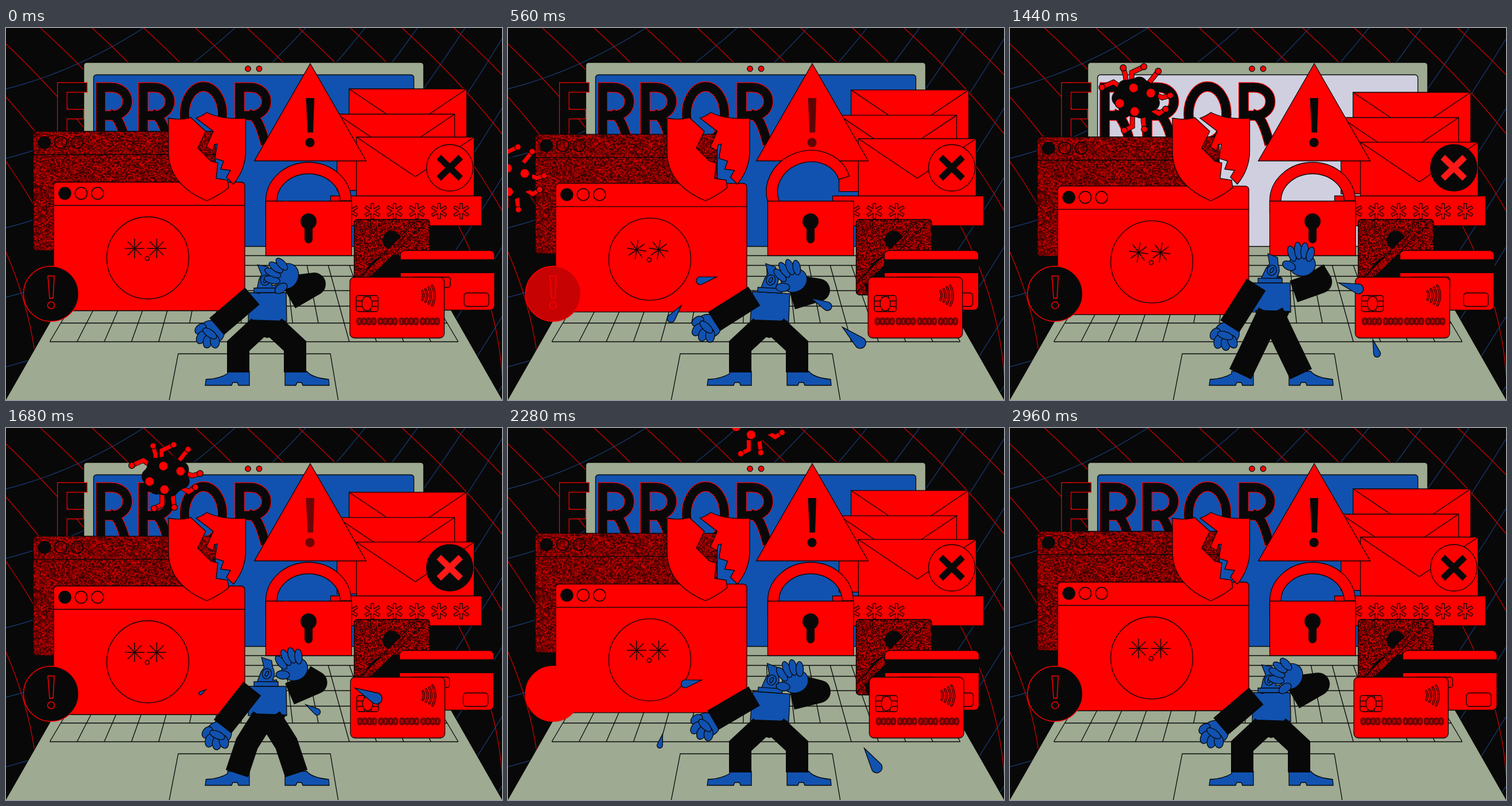
These frames come from a looping animation (864x648 px, 3000 ms). An HTML page with a canvas:

```html
<!DOCTYPE html>
<html lang="en">
<head>
<meta charset="utf-8">
<title>Error</title>
<style>
html, body { margin: 0; width: 100%; height: 100%; overflow: hidden; background: #080808; }
canvas { display: block; width: 864px; height: 648px; }
</style>
</head>
<body>
<canvas id="stage" width="864" height="648" role="img" aria-label="ERROR"></canvas>
<script>
const ctx = document.getElementById('stage').getContext('2d');
const LOOP = 3000, HALF = LOOP / 2, STEP = 40, TAU = Math.PI * 2, RAD = Math.PI / 180;
const RED = '#ff0000', BLUE = '#1152b0', INK = '#080808', METAL = '#9eaa92', PALE = '#d0cfe0';

// ---- drawing helpers
function paint(path, fill, line = INK, width = 1.3) {
  if (typeof path === 'string') path = new Path2D(path);
  if (fill) { ctx.fillStyle = fill; ctx.fill(path); }
  if (line) { ctx.strokeStyle = line; ctx.lineWidth = width; ctx.stroke(path); }
}
function oval(x, y, rx, ry, fill, line, width, turn = 0) {
  const p = new Path2D();
  p.ellipse(x, y, rx, ry, turn * RAD, 0, TAU);
  paint(p, fill, line, width);
}
const dot = (x, y, r, fill, line, width) => oval(x, y, r, r, fill, line, width);
function box(x, y, w, h, r, fill, line, width) {
  const p = new Path2D();
  p.roundRect(x, y, w, h, r);
  paint(p, fill, line, width);
}
function at(x, y, turn, draw) {
  ctx.save();
  ctx.translate(x, y);
  ctx.rotate(turn * RAD);
  draw();
  ctx.restore();
}
// thick line with a thin outline on both sides
function tube(path, width, fill, line, edge = 2) {
  paint(path, null, line, width + edge);
  paint(path, null, fill, width);
}
function capped(cap, draw) {
  ctx.lineCap = cap;
  draw();
  ctx.lineCap = 'butt';
}

// ---- motion helpers
const mix = (a, b, u) => a + (b - a) * u;
const wave = u => (1 - Math.cos(TAU * u)) / 2;
function ease(t, from, to) {
  const u = Math.min(1, Math.max(0, (t - from) / (to - from)));
  return u * u * (3 - 2 * u);
}
// rises from a to b, stays until c, falls until d
const hump = (t, a, b, c, d) => ease(t, a, b) * (1 - ease(t, c, d));
function redness(a) {
  const low = Math.round(mix(8, 0, a));
  return `rgb(${Math.round(mix(8, 255, a))},${low},${low})`;
}

// ---- grain texture
function makeGrain() {
  const c = document.createElement('canvas'), n = 256;
  c.width = c.height = n;
  const g = c.getContext('2d');
  g.fillStyle = '#c40000';
  g.fillRect(0, 0, n, n);
  let seed = 7;
  const rnd = () => (seed = (seed * 16807) % 2147483647) / 2147483647;
  g.fillStyle = '#260000';
  for (let y = 0; y < n; y += 1.5) for (let x = 0; x < n; x += 1.5)
    if (rnd() < 0.5) g.fillRect(x, y, 1.5, 1.5);
  return ctx.createPattern(c, 'repeat');
}
const grain = makeGrain();

// ---- scenery
function web() {
  const red = new Path2D(), blue = new Path2D();
  for (let x = -390; x < 864; x += 90)
    for (let y = 0; y <= 648; y += 18)
      red[y ? 'lineTo' : 'moveTo'](x + 1.1 * y - 0.00085 * y * y, y);
  for (let y = -15; y < 1500; y += 121)
    for (let x = 0; x <= 864; x += 18)
      blue[x ? 'lineTo' : 'moveTo'](x, y - 0.25 * x - 0.0008 * x * x);
  paint(blue, null, '#173468', 1.4);
  paint(red, null, '#c80000', 1.3);
}
function laptop(flash) {
  box(135.5, 60, 592, 330, 5, METAL);
  box(152.5, 81.5, 558, 300, 5, flash ? PALE : BLUE);
  dot(421.5, 71, 4.8, RED);
  dot(441, 71, 4.8, RED);
  paint('M152,380.5H712L866,650H-2Z', METAL);
  paint('M143,396.5H721', null);
  keyboard();
  paint('M284,650L300,567.5H565L579,650', null);
}
function keyboard() {
  const mid = 432, half = 355.5, far = -54, near = 546;
  const x = (o, y) => mid + o * (y - far) / (near - far);
  let d = '';
  for (const y of [413.5, 432.5, 457.5, 484.5, 514, 546.5]) d += `M${x(-half, y)},${y}H${x(half, y)}`;
  for (let i = 0; i <= 15; i++) {
    const o = -half + i * 47.4, end = i > 4 && i < 11 ? 514 : 546;
    d += `M${x(o, 413.5)},413.5L${x(o, end)},${end}`;
  }
  paint(d, null);
}
function lettering() {
  const r = x => `M${x},103.5V198M${x},103.5h18c38,0 38,49 0,49h-18m22,0Q${x + 33},158 ${x + 43},195`;
  const stroke = d => tube(d, 15.5, INK, RED, 2.4);
  capped('square', () => {
    stroke('M133,103.5H98V200M98,150H127');
    for (const x of [165, 239, 407]) stroke(r(x));
  });
  stroke('M311,150a33,48 0 1,0 66,0a33,48 0 1,0 -66,0');
}
function browser(y, x, w, h, skin) {
  at(x, y, 0, () => {
    box(0, 0, w, h, 6, skin);
    paint(`M0,40.5H${w}`, null);
    for (let i = 0; i < 3; i++) dot(19.5 + i * 28.5, 19.5, 10.5, i ? null : INK, INK, 1.5);
  });
}
function deadFace(y, turn) {
  at(247, y, 0, () => {
    dot(0, 0, 71.5);
    for (const x of [-23, 15.5]) at(x, -16.5, turn, () => {
      for (let k = 0; k < 4; k++) at(0, 0, k * 45, () => paint('M-17,0H17', null, INK, 1.5));
    });
    dot(-1, 1, 3.6);
  });
}
function virus(t) {
  const legs = 'M-24,-16L-40,-27L-60,-18M-18,-28L-19,-38L-23,-52M-8,-28V-44L13,-54M22,-26L38,-46M32,-6L45,0L59,-4' +
    'M26,20L39,28L51,20M12,28V40L14,55M-7,28V50L-21,57';
  const feet = [[-60, -18], [-23, -52], [13, -54], [38, -46], [59, -4], [51, 20], [14, 55], [-21, 57]];
  at(122 + 0.2455 * (t - 1040), 185 - 0.159 * (t - 1040), 0, () => {
    tube(legs, 7, RED, INK);
    for (const [x, y] of feet) dot(x, y, 5.4, RED);
    oval(0, 0, 38, 34, INK, null);
    for (let k = 0; k < 7; k++) {
      const a = k * TAU / 7 + 0.4;
      dot(29 * Math.cos(a), 23 * Math.sin(a), 14, INK, null);
    }
    for (const [x, y] of [[-5, -17], [25, -8], [-29, 10], [-3, 24]]) dot(x, y, 8.2, RED);
  });
}
function shield(open) {
  at(-6 * open, 0, 0, () => paint('M283,157Q303,161 322,156L348,180L334,209L357,232L369,235L366,262L386,265L388,278Q372,291 350,301Q283,273 283,215Z', RED));
  at(3.5 * open, 0, 0, () => paint('M331,157Q342,153 350,147Q375,160 417.5,157V215Q417,247 396,272L384,260L391,248L374,246L379,232L364,227L368,202L363,203L360,214L349,207L361,180Z', RED));
}
function noticeBadge(a) {
  dot(78.5, 463, 48, redness(a), RED, 1.5);
  paint('M73,432H84L82,471H76Z', null, RED, 1.5);
  dot(78.5, 483, 6, null, RED, 1.5);
}

// ---- right side
function envelope(x, y, bottom) {
  box(x, y, 205, bottom - y, 0, RED);
  paint(`M${x},${y}l102.5,69l102.5,-69`, null);
}
function mail(sink, cross) {
  envelope(597.5, 106 + 6 * sink, 250);
  envelope(576.5, 150 + 6 * sink, 283 + 6 * sink);
  envelope(610.5, 190 + 9 * sink, 320);
  dot(773, 243.5, 40.5, redness(1 - cross));
  paint('M754,225L792,262M792,225L754,262', null, cross > 0.45 ? '#ff1818' : INK, 11);
}
function password(count) {
  box(565.5, 292.5, 263, 52, 0, RED);
  for (let i = 0; i < count; i++) at(599.5 + i * 38.7, 319, 0, () =>
    capped('square', () => tube('M0,-11V11M-10,-6L10,6M-10,6L10,-6', 3.4, RED, INK, 2.4)));
}
function warning(a) {
  const mark = redness(a);
  paint('M530,62L627.5,231.5H432.5Z', RED);
  paint('M522.5,122H537L535,182H525.5Z', mark, null);
  dot(529.5, 199.5, 8, mark, null);
}
function padlock(turn) {
  at(462, 301, turn, () => paint('M-9.5,22V0A74.5,67 0 0 1 139.5,0H120A55,47 0 0 0 10,0V22Z', RED));
  box(452.5, 301.5, 149.5, 95, 0, RED);
  dot(527, 337, 14, INK, null);
  box(520, 342, 14, 33, 7, INK, null);
}
function portrait() {
  ctx.save();
  ctx.beginPath();
  ctx.roundRect(606, 333, 132, 132, 6);
  ctx.clip();
  box(606, 333, 132, 132, 6, grain);
  dot(672, 369.5, 16, INK, null);
  dot(672, 444, 50, INK, null);
  tube('M730,330L600,460', 12, grain, INK, 2);
  ctx.restore();
  box(606.5, 333.5, 131.5, 131.5, 6, null);
}
function backCard(x) {
  box(x, 387.5, 164, 104, 8, RED);
  paint(`M${x},403h164v24h-164Z`, INK, null);
  box(x + 20, 434, 67, 18, 4);
  box(x + 111, 461.5, 43, 23.5, 5);
}
function frontCard(x) {
  box(x, 434, 164.5, 106, 8, RED);
  at(x, 434, 0, () => {
    box(11, 32, 38, 28, 4);
    paint('M11,41.5H23M11,51H23M37,41.5H49M37,51H49M24,32V60M36,32V60', null);
    oval(30, 46, 9, 12.5, RED);
    for (let i = 0; i < 4; i++) {
      const p = new Path2D();
      p.arc(113, 32, 15 + i * 6.5, -0.52, 0.52);
      capped('round', () => tube(p, 1.6, RED, INK, 2.4));
    }
    ctx.font = 'bold 17px Roboto, "Liberation Sans", sans-serif';
    ctx.letterSpacing = '-1.3px';
    ctx.strokeStyle = INK;
    ctx.lineWidth = 1.2;
    ctx.strokeText('0000 0000 0000 0000', 11.5, 82.5);
  });
}

// ---- figure
function fingers(list) {
  for (const [x, y, rx, ry, turn] of list) oval(x, y, rx, ry, BLUE, INK, 1.3, turn);
}
function raisedHand(x, y, turn) {
  at(x, y, turn, () => {
    oval(4, 8, 23, 20, BLUE);
    fingers([[-14, -11, 6.5, 14, -18], [-3, -16, 6.5, 15, -6], [8, -16, 6.5, 14, 5], [18, -10, 6.5, 13, 16], [-19, 10, 12, 7.5, 25]]);
  });
}
function fist(x, y, turn) {
  at(x, y, turn, () => {
    oval(3, -4, 22, 20, BLUE);
    fingers([[-17, -6, 8, 11, 40], [-13, 8, 8, 12, 20], [-1, 13, 8, 12, 5], [11, 11, 8, 12, -15], [0, -1, 14, 6.5, 25]]);
  });
}
function trousers(lift, waist) {
  const hip = [mix(441, 452, lift), mix(520, 496, lift)];
  const knee = [mix(404.5, 428, lift), mix(554, 547, lift)];
  const foot = [mix(404.5, 401, lift), mix(600, 603, lift)];
  for (const side of [1, -1]) {
    const pts = [hip, knee, foot].map(([x, y]) => [454 + side * (x - 454), y].join());
    paint('M' + pts.join('L'), null, INK, mix(39, 42, lift));
  }
  paint(`M427,${waist - 2}L488,${waist}L476,${waist + 24}L455,${waist + 30}L434,${waist + 24}Z`, INK, null);
}
// lift: 0 crouching, 1 standing; sway: 0..1 swing of arms and torso
function figure(lift, sway) {
  const low = 1 - lift, waist = 493 + 17 * low;

  paint('M386,598H424V622.5H405L403,617.5H395L393,622.5H347L348.5,612Q372,611 386,602Z', BLUE);
  paint('M486,598H524Q532,609 562,612L563,622.5H517L515,617.5H507L505,622.5H486Z', BLUE);

  const hand = [480 + 14 * sway + lift * (25 - 10 * sway), 432 + 3 * sway - 28 * lift];
  const elbow = [537 + 5 * sway + 4 * lift, 446 + 13 * sway - 4 * lift];
  ctx.lineJoin = 'round';
  paint(`M494,${459 + 12 * low}L${elbow}L${hand[0] + 24},${hand[1] + 18}`, null, INK, 40);
  ctx.lineJoin = 'miter';

  at(457, waist + 1, 4 * sway, () => {
    paint('M-34,-50H31L32,1H-35Z', BLUE);
    at(-2, -52, -13 * low * (1 - 0.6 * sway), () => {
      paint('M-6,-49L11,-42L12,-30Q17,-19 10,-8H17V0H-17V-7L-9,-24L-3,-31Z', BLUE);
      oval(1, -20, 8, 9, BLUE, INK, 1.3, 20);
      oval(1, -20, 2.5, 5, BLUE, INK, 1.3, 30);
    });
    paint('M-25,-58H17V-50H-25Z', BLUE);
  });
  trousers(lift, waist);

  const shoulder = [429, 447 + 20 * low];
  const wrist = [367 - 10 * sway + 16 * lift, 520 - 11 * sway];
  const aim = Math.atan2(wrist[1] - shoulder[1], wrist[0] - shoulder[0]);
  fist(wrist[0] + 20 * Math.cos(aim) + 3, wrist[1] + 20 * Math.sin(aim), aim / RAD - 130);
  paint(`M${shoulder}L${wrist}`, null, INK, 39);
  raisedHand(...hand, -60 * low * (1 - 0.7 * sway));
}

// start and end time, start x, end x, end y
const drops = [
  [400, 800, 400, 314, 452], [240, 1060, 335, 264, 566],
  [1900, 2700, 405, 286, 458], [1640, 2400, 351, 264, 563],
  [300, 1600, 494, 639, 573], [100, 1100, 487, 650, 622],
  [1200, 2080, 540, 656, 488], [1560, 2700, 505, 655, 642]
];
function sweat(t) {
  for (const [t0, t1, x0, x1, y1] of drops) {
    const u = (t - t0) / (t1 - t0);
    if (u <= 0 || u >= 1) continue;
    const y0 = 428 + 0.23 * (y1 - 450), dx = x1 - x0, dy = y1 - y0;
    const turn = Math.atan2(dy, 2 * (1 - u) * dx) / RAD;
    const k = (dx < 0 ? 35 : 49) * Math.sqrt(Math.sin(Math.PI * u));
    at(x0 + dx * u * (2 - u), y0 + dy * u, turn, () =>
      paint(`M${-0.55 * k},0L${0.24 * k},${-0.19 * k}A${0.2 * k},${0.2 * k} 0 1 1 ${0.24 * k},${0.19 * k}Z`, BLUE));
  }
}

function frame(t) {
  const half = t % HALF, bob = wave(t / LOOP), front = 268.5 + 7 * bob;
  const flash = (t >= 200 && t < 280) || (t >= 1400 && t < 1480);
  ctx.fillStyle = INK;
  ctx.fillRect(0, 0, 864, 648);
  web();
  laptop(flash);
  lettering();
  browser(180 + 10.5 * hump(t, 0, 1130, 1130, LOOP), 47.5, 317, 208, grain);
  virus(t);
  browser(front, 83, 333, 224, RED);
  deadFace(front + 132, 11 * hump(t % 1000, 300, 500, 500, 700));
  shield(hump(half, 400, 560, 820, 1000));
  noticeBadge(hump(half, 380, 640, 820, 1120));
  mail(bob, hump(t, 1160, 1400, 1820, 2260));
  password(Math.round(6 - 5 * hump(half, 390, 680, 640, 960)));
  warning(hump(half, 40, 360, 360, 690));
  padlock(-18 * hump(t, 300, 480, 640, 1020));
  portrait();
  backCard(687 - 32 * (hump(t, 100, 600, 600, 1840) + hump(t, 1880, 2340, 2340, 3100)));
  frontCard(599 + 31 * (hump(t, 120, 660, 660, 1600) + hump(t, 1600, 2340, 2340, 2960)));
  figure(hump(t, 680, 1120, 1560, 1860), ease(wave((half - 80) / HALF), 0, 1));
  sweat(t);
}

const begin = performance.now();
function tick() {
  const t = (performance.now() - begin) % LOOP;
  frame(Math.floor(t / STEP) * STEP);
  requestAnimationFrame(tick);
}
tick();
</script>
</body>
</html>
```
